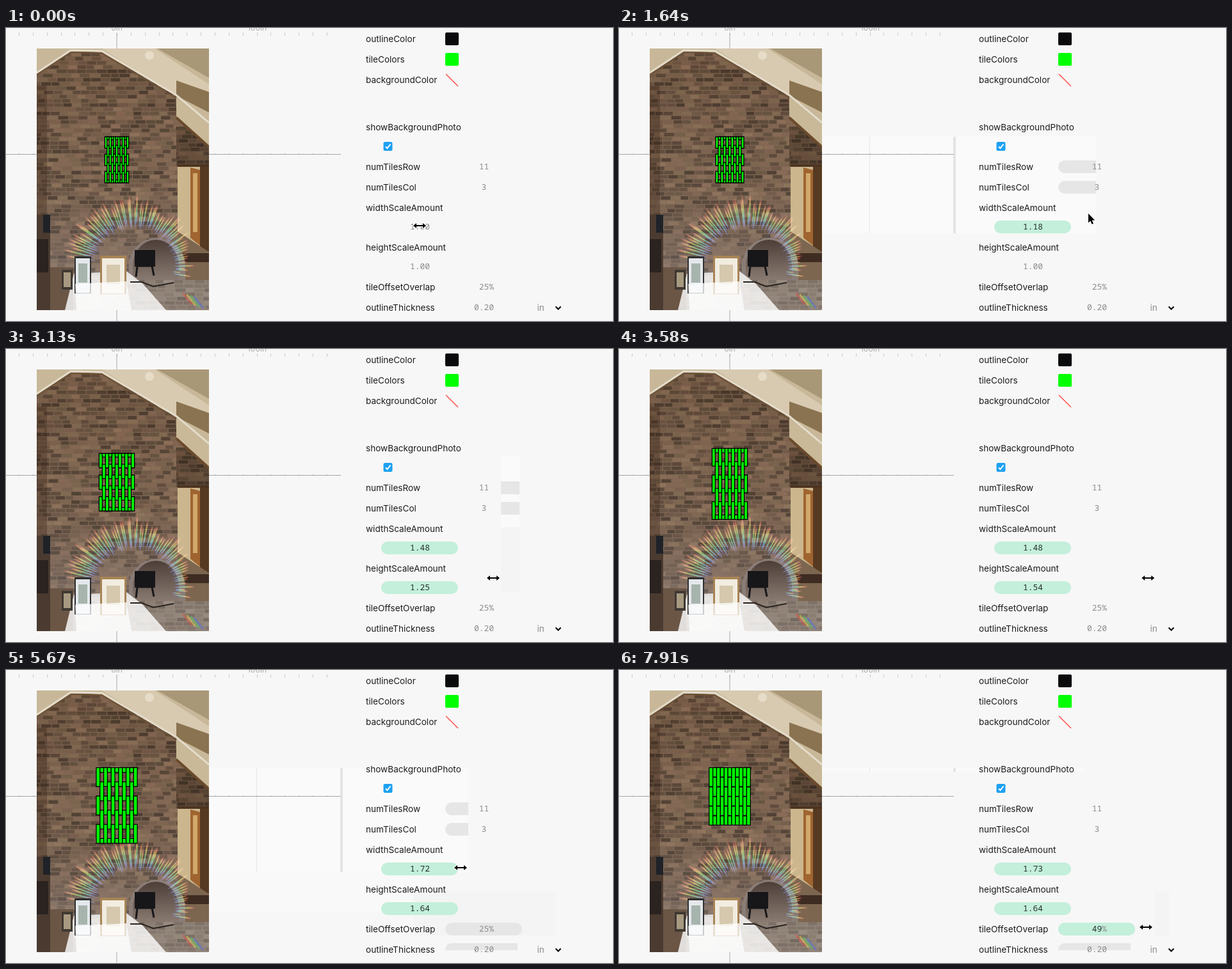
Recreate the animation shown at these times as an HTML page with a canvas. Size 948 by 458 pixels, loop 8000 ms.

```html
<!DOCTYPE html>
<html lang="en">
<head>
<meta charset="utf-8">
<style>
html, body { margin: 0; width: 100%; height: 100%; overflow: hidden; background: #f7f7f7; }
canvas { display: block; }
</style>
</head>
<body>
<canvas id="stage" width="948" height="458"></canvas>
<script>
const stage = document.getElementById('stage').getContext('2d');
const LOOP = 8000, STEP = 149.25;
const SANS = '13.6px Inter, sans-serif', MONO = '500 13px "Noto Sans Mono", monospace';
const GREY = '#8c8c8c', DARK = '#26302b', MINT = '#c3efdb';

// each track holds [step, value...] rows
const WIDTH = [[6, 1], [8, 1.04], [11, 1.18], [13, 1.48], [35, 1.48], [38, 1.72], [39, 1.73]];
const HEIGHT = [[19, 1], [21, 1.25], [25, 1.64]];
const OVERLAP = [[46, 25], [53, 49]];
const POINTER = [
  [5, 646, 309], [11, 733, 290], [13, 790, 285], [14, 790, 285], [18, 636, 371], [19, 636, 371],
  [21, 761, 358], [25, 848, 358], [27, 848, 358], [29, 775, 421], [30, 775, 421], [31, 639, 339],
  [32, 633, 309], [35, 633, 309], [38, 710, 309], [42, 776, 405], [43, 774, 407], [46, 774, 407], [53, 823, 402]
];

function track(rows, step, col = 1) {
  let i = rows.findIndex(r => r[0] >= step);
  if (i < 0) i = rows.length - 1;
  const a = rows[Math.max(i - 1, 0)], b = rows[i];
  const p = a === b ? 0 : Math.min(1, (step - a[0]) / (b[0] - a[0]));
  return a[col] + (b[col] - a[col]) * p;
}

function stateAt(step) {
  const within = (a, b) => step >= a && step <= b;
  return {
    x: track(POINTER, step), y: track(POINTER, step, 2),
    w: track(WIDTH, step), h: track(HEIGHT, step), overlap: track(OVERLAP, step),
    arrow: within(8, 12) || within(15, 17) || within(28, 31)
  };
}

function rect(c, color, x, y, w, h) {
  c.fillStyle = color;
  c.fillRect(x, y, w, h);
}
function round(c, color, x, y, w, h, r) {
  c.fillStyle = color;
  c.beginPath();
  c.roundRect(x, y, w, h, r);
  c.fill();
}
function trace(c, pts) {
  c.beginPath();
  for (let i = 0; i < pts.length; i += 2) c.lineTo(pts[i], pts[i + 1]);
}
function poly(c, color, ...pts) {
  c.fillStyle = color;
  trace(c, pts);
  c.fill();
}
function line(c, color, width, ...pts) {
  c.strokeStyle = color;
  c.lineWidth = width;
  trace(c, pts);
  c.stroke();
}
function arch(c, color, x, rx, ry, base) {
  c.fillStyle = color;
  c.beginPath();
  c.ellipse(x, 372, rx, ry, 0, Math.PI, 0);
  c.lineTo(x + rx, base);
  c.lineTo(x - rx, base);
  c.fill();
}
function text(s, x, y, color = '#1c1c1c', font = SANS, align = 'left') {
  stage.font = font;
  stage.fillStyle = color;
  stage.textAlign = align;
  stage.fillText(s, x, y);
}
function clipped(x0, y0, x1, y1, draw) {
  stage.save();
  stage.beginPath();
  stage.rect(x0, y0, x1 - x0, y1 - y0);
  stage.clip();
  draw();
  stage.restore();
}

let seed = 7;
const rand = () => (seed = seed * 16807 % 2147483647) / 2147483647;

function bricks(c, x0, y0, x1, y1, sat, light, spread) {
  rect(c, `hsl(27 ${sat}% ${light + 5}%)`, x0, y0, x1 - x0, y1 - y0);
  for (let y = y0; y < y1; y += 6.6) {
    for (let x = x0 - rand() * 14; x < x1; ) {
      const w = 11 + rand() * 5, l = light + (rand() - .55) * spread;
      const left = Math.max(x, x0), right = Math.min(x + w, x1);
      rect(c, `hsl(${23 + rand() * 8} ${sat}% ${l}%)`, left, y, Math.max(0, right - left), Math.min(5.4, y1 - y));
      x += w + 1.2;
    }
  }
}

function rainbow(c) {
  const rays = 58, hues = ['#4060ff00', '#4a70f0a0', '#30d0d0a0', '#40d860a0', '#e8d848a0', '#f06040a0', '#f0405000'];
  c.save();
  c.translate(202, 374);
  c.globalCompositeOperation = 'screen';
  for (let i = 0; i < rays; i++) {
    const t = i / rays, r0 = 57 + rand() * 8, r1 = 112 - 34 * t * t + (rand() - .5) * 20;
    const g = c.createLinearGradient(r0, 0, r1, 0);
    hues.forEach((s, j) => g.addColorStop(j / 6, s));
    c.save();
    c.rotate(-3 + t * 3.2 + rand() * .04);
    poly(c, g, r0, 0, r1, 0, r1, r1 * .024, r0, r0 * .024);
    c.restore();
  }
  c.restore();
}

function makePhoto() {
  const photo = document.createElement('canvas');
  photo.width = 269;
  photo.height = 409;
  const c = photo.getContext('2d');
  c.translate(-48, -32);
  bricks(c, 48, 32, 317, 441, 22, 37, 24);
  const shade = c.createLinearGradient(0, 60, 0, 400);
  shade.addColorStop(0, 'rgba(70,40,15,.14)');
  shade.addColorStop(.55, 'rgba(110,95,85,.12)');
  shade.addColorStop(1, 'rgba(160,155,160,.38)');
  rect(c, shade, 48, 32, 269, 409);
  rect(c, 'rgba(50,30,18,.3)', 48, 90, 16, 351);

  // ceiling and beams
  poly(c, '#c8b899', 48, 32, 317, 32, 317, 160, 266, 106, 150, 38, 100, 36, 63, 62, 48, 72);
  poly(c, '#d8cab0', 150, 32, 232, 32, 317, 88, 317, 108, 266, 106);
  poly(c, '#a99878', 236, 32, 317, 32, 317, 78);
  poly(c, '#8a7350', 266, 82, 317, 100, 317, 132, 266, 106);
  line(c, '#e4dccb', 3, 48, 70, 101, 35, 150, 36, 266, 105, 317, 148);
  line(c, '#6d5235', 2, 48, 73, 102, 38, 149, 39, 265, 109);
  bricks(c, 266, 154, 317, 216, 26, 27, 16);
  poly(c, '#c9b999', 266, 107, 317, 150, 317, 184, 266, 138);
  line(c, '#6b4b2c', 4, 266, 140, 317, 186);
  round(c, '#e6dcc8', 217, 36, 14, 14, 7);

  // room on the right
  rect(c, '#cbb68d', 268, 216, 49, 135);
  rect(c, '#4b3421', 268, 213, 49, 4);
  poly(c, '#9f6430', 288, 218, 303, 222, 303, 340, 288, 328);
  rect(c, '#d0a96b', 292, 227, 7, 92);
  rect(c, '#563a22', 303, 217, 14, 140);
  poly(c, '#7d6650', 268, 318, 317, 350, 317, 400, 268, 400);
  rect(c, '#3e2c22', 276, 352, 41, 14);

  // shelf on the left
  rect(c, '#4a3a30', 48, 292, 21, 149);
  rect(c, '#1f2228', 58, 292, 11, 28);
  rect(c, '#2a2320', 48, 330, 18, 52);
  rect(c, '#6b5646', 69, 374, 36, 67);

  // fireplace
  const dark = c.createLinearGradient(0, 328, 0, 395);
  dark.addColorStop(0, '#4a3c35');
  dark.addColorStop(1, '#8a7b72');
  arch(c, '#8a7d77', 236, 44, 44, 400);
  arch(c, dark, 234, 36, 41, 394);
  bricks(c, 105, 394, 317, 441, 10, 49, 14);
  rect(c, '#17171a', 201, 347, 32, 26);
  line(c, '#17171a', 3, 203, 389, 205, 372, 228, 372, 231, 387);
  rainbow(c);

  // light on the floor, framed pictures
  poly(c, 'rgba(255,255,255,.8)', 92, 441, 106, 384, 188, 380, 214, 400, 250, 441);
  rect(c, '#30302f', 107, 357, 26, 58);
  rect(c, '#e4e8ec', 109, 360, 22, 54);
  rect(c, '#a7b4ad', 113, 368, 14, 30);
  rect(c, '#a88455', 147, 356, 41, 60);
  rect(c, '#f2ece0', 150, 360, 35, 55);
  rect(c, '#d5c8ac', 157, 370, 21, 30);
  rect(c, '#3f3933', 87, 378, 17, 31);
  rect(c, '#a89a80', 90, 382, 11, 23);
  poly(c, 'rgba(255,255,255,.75)', 110, 441, 108, 400, 188, 396, 196, 441);
  line(c, '#28231f', 2, 194, 397, 212, 397, 230, 404, 262, 398);
  c.globalAlpha = .5;
  ['#e0504c', '#e8d04c', '#50c860', '#5070e0'].forEach((s, i) =>
    line(c, s, 3, 276 + i * 6, 414 + i * 2, 290 + i * 6, 432 + i * 2));
  return photo;
}
const photo = makePhoto();

function hoverPill(y) { round(stage, '#e6e6e6', 686, y, 120, 20, 10); }

function livePanel(top, right, bottom) {
  clipped(317, top, right, bottom, () => {
    rect(stage, '#fafafa', 317, top, 500, 300);
    rect(stage, '#e6e6e6', 391, top, 1, 300);
    rect(stage, '#e4e4e4', 522, top, 4, 300);
    hoverPill(207);
    hoverPill(239);
  });
}

// leftover patches of the panel's pressed look
function patches(step, s) {
  const edge = s.x + 12;
  if (step >= 6 && step < 20) livePanel(170, step < 13 ? edge : 802, 321);
  if (step >= 20 && step < 25 && edge < 802) {
    rect(stage, '#fafafa', edge, 168, 802 - edge, 110);
    rect(stage, '#f4f4f4', edge, 279, 802 - edge, 102);
    clipped(edge, 168, 802, 278, () => {
      for (const y of [207, 239]) rect(stage, '#e6e6e6', 696, y, 106, 20);
    });
  }
  if (step >= 25 && step < 47) rect(stage, '#f9f9f9', 317, 153, 343, 226);
  if (step >= 28) {
    const left = step < 31 ? 763 : step < 47 ? 637 : Math.max(edge, 836);
    rect(stage, '#f4f4f4', left, 346, 859 - left, 69);
    const from = step < 31 ? 763 : 680;
    clipped(from, 347, 859, 438, () => hoverPill(395));
    clipped(from, 427, 799, 438, () => hoverPill(427));
  }
  if (step >= 36 && step < 47) livePanel(153, step < 39 ? edge : 726, 316);
  if (step >= 47) livePanel(153, 726, 159);
}

function ruler() {
  for (let i = -7; i <= 15; i++) {
    const x = Math.round(173 + i * 21.85);
    rect(stage, '#c9c9c9', x, 7, 1, 5);
    rect(stage, '#b5b5b5', x, 196, 1, 1);
  }
  text('0in', 173, 4, '#aaa', '12px Inter, sans-serif', 'center');
  text('100in', 392, 4, '#aaa', '12px Inter, sans-serif', 'center');
  rect(stage, '#aaa', 172.5, 8, 1, 450);
  rect(stage, '#a6a6a6', 0, 197, 523, 1);
}

function tiles({ w, h, overlap }) {
  const pitch = 3.39 * w, len = 18 * h, period = 2 * len * (1 - overlap / 100);
  const left = 173 - 5.5 * pitch, top = 197 - 27 * h, bottom = top + 2 * period + len;
  stage.fillStyle = '#00ff00';
  stage.strokeStyle = '#000';
  stage.lineWidth = 1.3;
  for (let col = 0; col < 11; col++) {
    for (let row = -1; row < 3; row++) {
      const y = top + row * period + (col % 2) * period / 2;
      const y0 = Math.max(y, top), y1 = Math.min(y + len, bottom);
      if (y1 - y0 < .5) continue;
      stage.beginPath();
      stage.rect(left + col * pitch, y0, pitch, y1 - y0);
      stage.fill();
      stage.stroke();
    }
  }
}

function value(s, x, y, active) { text(s, x, y, active ? DARK : GREY, MONO, 'center'); }

function controls(step, s) {
  const labels = { outlineColor: 17, tileColors: 49, backgroundColor: 81, showBackgroundPhoto: 155,
    numTilesRow: 217, numTilesCol: 249, widthScaleAmount: 281, heightScaleAmount: 343,
    tileOffsetOverlap: 405, outlineThickness: 437 };
  for (const name in labels) text(name, 562, labels[name] + 5);
  round(stage, '#0a0a0d', 686, 7, 21, 20, 2);
  round(stage, '#00ff00', 686, 39, 21, 20, 2);
  line(stage, '#ff4a45', 1.4, 687, 72, 706, 91);
  round(stage, '#1ea1f1', 589.5, 178, 14, 14, 2.5);
  line(stage, '#fff', 2, 593, 185.5, 595.5, 188, 600.5, 181.5);

  const wide = step >= 6, tall = step >= 20, shifted = step >= 47;
  if (wide) round(stage, MINT, 586, 301, 120, 20, 10);
  if (tall) round(stage, MINT, 586, 363, 120, 20, 10);
  if (shifted) round(stage, MINT, 686, 395, 120, 20, 10);
  value('11', 746.5, 221);
  value('3', 746.5, 253);
  value(s.w.toFixed(2), 646.5, 315, wide);
  value(s.h.toFixed(2), 646.5, 377, tall);
  value(Math.round(s.overlap), 746.5, 409, shifted);
  value('%', 758.2, 409);
  value('0.20', 746.5, 441);
  text('in', 829.5, 442, GREY);
  line(stage, '#000', 2, 858.5, 435.5, 862.5, 439.5, 866.5, 435.5);
}

function cursor({ x, y, arrow }) {
  const shape = arrow
    ? [0, 0, 0, 14.5, 3.3, 11.5, 5.6, 16.8, 8, 15.8, 5.7, 10.6, 10.2, 10.4]
    : [-10, 0, -5, -4, -5, -1, 5, -1, 5, -4, 10, 0, 5, 4, 5, 1, -5, 1, -5, 4];
  stage.save();
  stage.translate(x, y);
  stage.lineJoin = 'round';
  trace(stage, shape);
  stage.closePath();
  stage.strokeStyle = '#fff';
  stage.lineWidth = 2;
  stage.stroke();
  stage.fillStyle = '#000';
  stage.fill();
  stage.restore();
}

function draw(now) {
  const step = Math.floor((now % LOOP + 6) / STEP), s = stateAt(step);
  rect(stage, '#f7f7f7', 0, 0, 948, 458);
  patches(step, s);
  ruler();
  stage.drawImage(photo, 48, 32);
  tiles(s);
  controls(step, s);
  cursor(s);
}

const start = performance.now();
function tick() {
  draw(performance.now() - start);
  requestAnimationFrame(tick);
}
tick();
</script>
</body>
</html>
```
